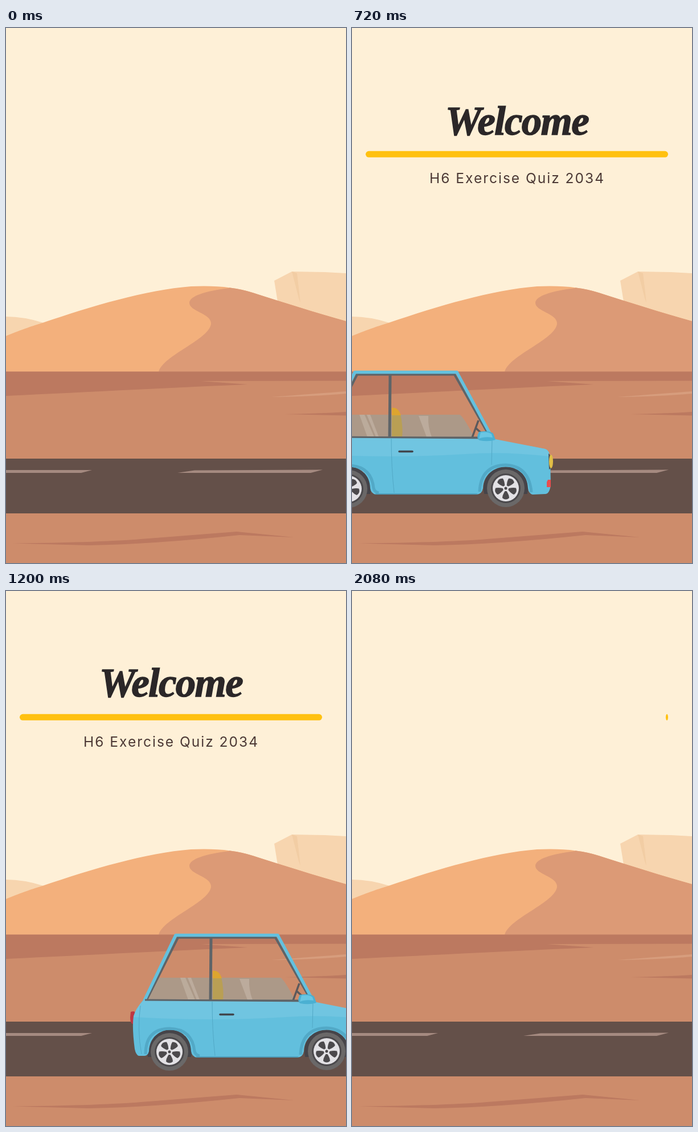
An HTML page with a canvas that plays this animation: 597x938 px, repeating every 2.12 s.

```html
<!DOCTYPE html>
<html lang="en">
<head>
<meta charset="utf-8">
<title>Desert drive</title>
<style>
html, body { margin: 0; width: 100%; height: 100%; overflow: hidden; background: #fef0d7; }
canvas { display: block; width: 597px; height: 938px; }
</style>
</head>
<body>
<canvas id="stage" width="597" height="938"></canvas>
<script>
const ctx = document.getElementById('stage').getContext('2d');
const W = 597, H = 938, LOOP = 2120, STEP = 40;

// [time, value] keys joined by smooth curves
const carKeys = [[0, -707], [480, -360], [720, -191], [1040, 0], [1400, 232], [1720, 438], [2120, 696]];
const riseKeys = [[400, 80], [480, 71], [560, 35], [640, 14], [720, 5], [800, 2], [1040, 0]];

function curve(keys, t) {
  const last = keys.length - 1;
  if (t <= keys[0][0]) return keys[0][1];
  if (t >= keys[last][0]) return keys[last][1];
  let i = 0;
  while (t > keys[i + 1][0]) i++;
  const slope = k => {
    const a = keys[Math.max(0, k - 1)], b = keys[Math.min(last, k + 1)];
    return (b[1] - a[1]) / (b[0] - a[0]);
  };
  const [t0, a] = keys[i], [t1, b] = keys[i + 1], d = t1 - t0;
  const u = (t - t0) / d, v = 1 - u;
  return a * v * v * (1 + 2 * u) + b * u * u * (3 - 2 * u)
    + d * u * v * (slope(i) * v - slope(i + 1) * u);
}

function smooth(t, from, to) {
  const p = Math.min(1, Math.max(0, (t - from) / (to - from)));
  return p * p * (3 - 2 * p);
}

function fill(color, d) {
  ctx.fillStyle = color;
  ctx.fill(new Path2D(d));
}

function line(color, width, d) {
  ctx.strokeStyle = color;
  ctx.lineWidth = width;
  ctx.stroke(new Path2D(d));
}

function disc(color, x, y, rx, ry = rx) {
  ctx.fillStyle = color;
  ctx.beginPath();
  ctx.ellipse(x, y, rx, ry, 0, 0, 7);
  ctx.fill();
}

function rect(color, x, y, w, h) {
  ctx.fillStyle = color;
  ctx.fillRect(x, y, w, h);
}

function clipped(x, y, w, h, draw) {
  ctx.save();
  ctx.beginPath();
  ctx.rect(x, y, w, h);
  ctx.clip();
  draw();
  ctx.restore();
}

const DUNE = 'M0 540C30 528 47 522 64 517C150 488 245 459 325 453Q390 450 433 464C490 482 540 498 597 514V603H0Z';

function scenery() {
  rect('#fef0d7', 0, 0, W, H);
  fill('#f7d5af', 'M471 443L502 427L560 428L597 430V520L477 480Z');
  fill('#f2cda4', 'M502 427L511 430L517 482L514 474Z');
  fill('#f7d5af', 'M0 506Q32 506 66 517L0 541Z');
  fill('#f3b07c', DUNE);
  ctx.save();
  ctx.clip(new Path2D(DUNE));
  fill('#dc9a76', 'M392 456C350 461 322 470 322 482C322 497 360 500 360 518C358 546 275 574 268 603H597V440H392Z');
  ctx.restore();

  rect('#cd8c6b', 0, 602.5, W, 336);
  fill('#bc7960', 'M0 602.5H597V618.5L342 619L425 625C300 630 150 638 0 645Z');
  fill('#d79d7d', 'M466 647Q545 641 597 637V641Q540 646 466 647Z');
  fill('#bc7960', 'M488 677Q550 676 597 673V679.5Z');

  rect('#645049', 0, 755, W, 96);
  fill('#a58a80', 'M0 775H151L132 780H0Z');
  fill('#a58a80', 'M301 780L331 775.5L556 774.5L535 780Z');
  fill('#bc7960', 'M12 903.5Q170 902 250 895L405 883L506 893L410 889Q260 905 145 907Z');
}

function wheel(x, y) {
  disc('#6a6868', x, y, 33);
  disc('#4b494c', x, y, 26);
  disc('#e2e1e5', x, y, 23);
  for (let k = 0; k < 5; k++) {
    ctx.save();
    ctx.translate(x, y);
    ctx.rotate(k * Math.PI * 2 / 5);
    fill('#4b494c', 'M-1.5 5Q-6 12 -6 17Q0 22 6 17Q6 12 1.5 5Z');
    ctx.restore();
  }
  disc('#4b494c', x, y, 2.5);
}

function cabin() {
  fill('rgba(167,156,142,.85)', 'M164 678H380Q386 680 406 718H145Z');
  fill('rgba(196,182,167,.65)', 'M204 678H213L230 717H218Z');
  fill('rgba(196,182,167,.65)', 'M217 678H223L238 717H233Z');
  fill('rgba(196,182,167,.65)', 'M308 680H325Q324 700 331 717H322Z');
  fill('#b99f54', 'M261 677H276Q281 700 279 717H261Z');
  fill('#dda52f', 'M261 666Q272 664 277 679H261Z');
  line('#5b595c', 3.5, 'M413 688L402 718M409 702L420 712');

  ctx.lineJoin = 'round';
  line('#5e6468', 4, 'M200 607.5H371L434 718.5H144Z');
  line('#5e6468', 5, 'M258 606L257 718');
  line('#63c1df', 5.5, 'M141 718L196 603.5H375L439 722');
}

function car(x) {
  ctx.save();
  ctx.translate(x, 0);
  cabin();

  clipped(100, 740, 450, 77, () => {
    disc('#464449', 185, 808, 39);
    disc('#464449', 461, 807, 39);
  });
  fill('#bd3743', 'M117 738Q124 735 125 740L123 760Q116 760 116 748Z');
  fill('#62bfdd', `M139 717L438 719L448 723C480 729 510 734 530 738
    Q538 740 539 754L540 801Q538 816 531 817L508 818Q501 816 500 807
    C499 757 423 757 421 807Q419 818 409 818H233Q224 816 223 807
    C222 757 151 757 149 807Q147 815 141 815H131Q126 813 124 803
    Q119 765 122 745Q126 732 139 717Z`);
  fill('#70c5e1', 'M139 718L438 720L530 738Q537 740 538 751Q455 742 390 747Q260 755 122 747Q125 733 139 718Z');
  line('#52a9c7', 5, 'M143 812Q143 768 185 767Q225 768 229 807Q231 814 238 815M415 813Q417 767 461 766Q502 768 506 814');
  line('#4e9db9', 2, 'M232 817H411');
  line('#52a9c7', 1, 'M260 720Q260 770 265 815M437 721L436 766M134 727Q128 770 136 812');
  line('#5e6468', 3, 'M142 717L436 719');
  ctx.lineCap = 'round';
  line('#41464d', 3.5, 'M274 742.5H297');
  ctx.lineCap = 'butt';
  fill('#4bb0d2', 'M414 708Q432 705 439 711L443 722Q430 726 415 723Q408 719 414 708Z');
  fill('#69c6e3', 'M417 709Q430 707 436 712L438 718Q423 716 414 720Z');

  fill('#4e5255', 'M536 746Q540 747 541 760Q541 773 537 774Z');
  disc('#e0bd46', 540.5, 760, 3.5, 12);
  fill('#e84e50', 'M535 792H540V805H533V796Z');
  wheel(185, 808);
  wheel(461, 807);
  ctx.restore();
}

function label(text, font, spacing, color, x, y) {
  ctx.font = font;
  ctx.letterSpacing = spacing + 'px';
  ctx.fillStyle = color;
  ctx.fillText(text, x, y);
}

function title(t) {
  const drop = curve(riseKeys, t < 970 ? t : 1940 - t);
  clipped(0, 0, W, 206, () => {
    ctx.textAlign = 'left';
    const y = 181.5 + drop;
    label('Welcome', 'italic bold 71px "Liberation Serif", serif', -1.7, '#2b2728', 164, y);
    ctx.strokeStyle = '#2b2728';
    ctx.lineWidth = 1.5;
    ctx.strokeText('Welcome', 164, y);
  });
  clipped(0, 248, W, 60, () => {
    ctx.textAlign = 'center';
    label('H6 Exercise Quiz 2034', '24.5px Inter, sans-serif', 2, '#4c3935', 290, 274 - drop * 0.4);
  });
}

function bar(t) {
  const left = 24 + 531 * smooth(t, 1710, 2100);
  const right = 24 + 531 * smooth(t, 20, 420);
  const w = right - left;
  if (w < 0.5) return;
  ctx.fillStyle = '#ffc110';
  ctx.beginPath();
  if (w < 11) ctx.ellipse(left + w / 2, 221.3, w / 2, 5.5, 0, 0, 7);
  else ctx.roundRect(left, 215.8, w, 11, 5.5);
  ctx.fill();
}

function frame() {
  const t = Math.floor(performance.now() % LOOP / STEP) * STEP;
  scenery();
  car(curve(carKeys, t));
  title(t);
  bar(t);
  requestAnimationFrame(frame);
}
frame();
</script>
</body>
</html>
```
